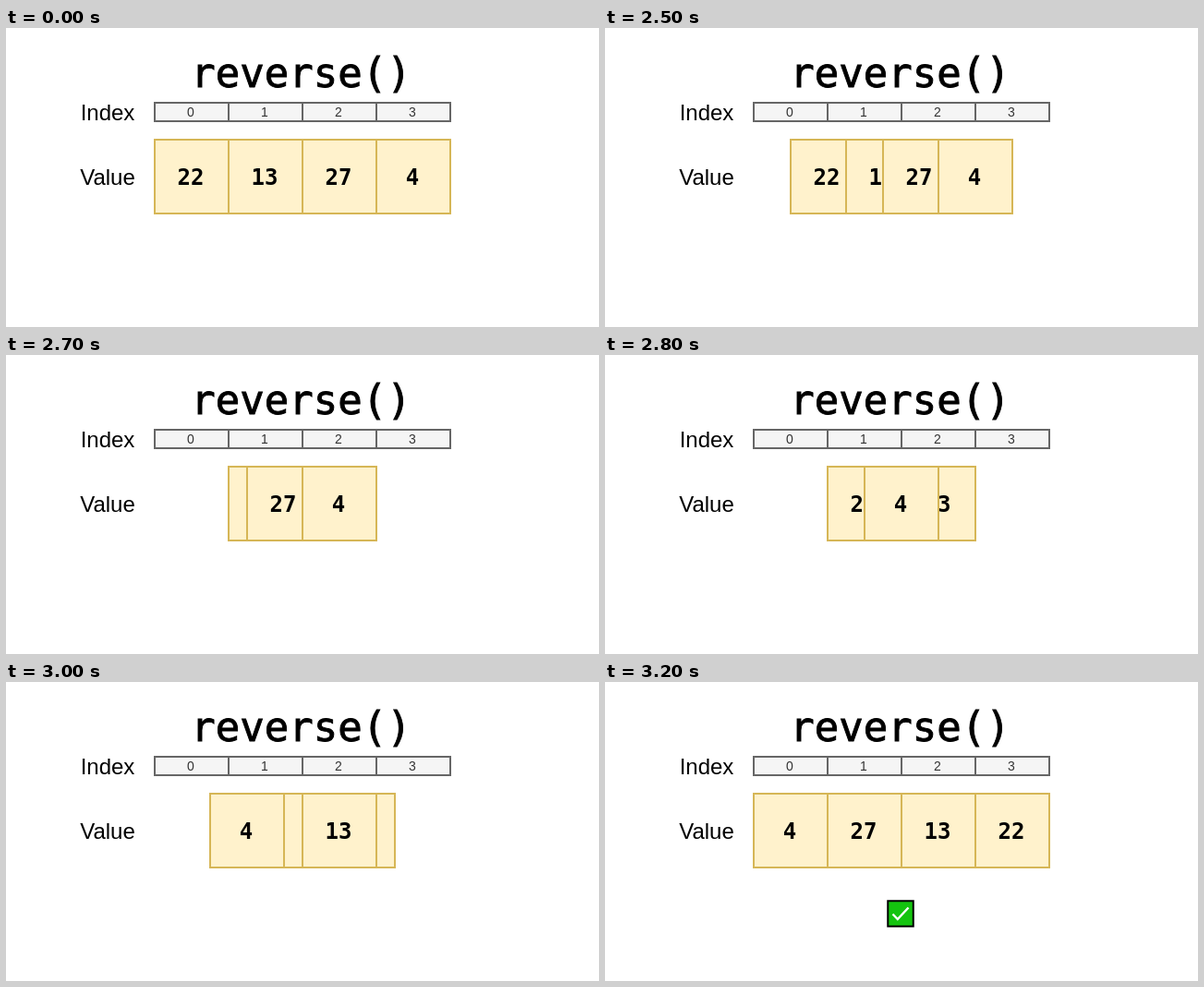
Recreate the animation shown at these times as an HTML page. Size 642 px wide and 324 px high, loop 5.2 s.

```html
<!DOCTYPE html>
<html lang="en">
<head>
<meta charset="utf-8">
<title>reverse()</title>
<style>
  html, body { margin: 0; width: 100%; height: 100%; overflow: hidden; background: #fff; }
  svg { display: block; width: 642px; height: 324px; }
  text { text-anchor: middle; }
  .title { font: 44px "DejaVu Sans Mono", monospace; stroke: #000; stroke-width: .9px; }
  .label { font: 24px "Liberation Sans", Arial, sans-serif; }
  .index { fill: #f5f5f5; stroke: #666; stroke-width: 2px; }
  .num { font: 14px "Liberation Sans", Arial, sans-serif; fill: #333; }
  .cell rect { fill: #fff2cc; stroke: #d6b656; stroke-width: 2px; }
  .cell text { font: bold 24px "DejaVu Sans Mono", monospace; }
  .line { fill: none; stroke: #000; stroke-width: 2px; }
  .head { stroke: #000; stroke-width: 2px; stroke-miterlimit: 10; }

  /* --dir: 1 moves right, -1 moves left */
  .cell, .arrows, .done { animation: 5.2s step-end infinite; }
  .outer { animation-name: outer; }
  .inner { animation-name: inner; }
  .arrows { animation-name: arrows; }
  .done { animation-name: done; }

  @keyframes outer {
    0% { transform: translateX(0); }
    48.076% { transform: translateX(calc(var(--dir) * 40px)); }
    49.999% { transform: translateX(calc(var(--dir) * 60px)); }
    51.922% { transform: translateX(calc(var(--dir) * 80px)); }
    53.845% { transform: translateX(calc(var(--dir) * 120px)); }
    55.768% { transform: translateX(calc(var(--dir) * 140px)); }
    57.691% { transform: translateX(calc(var(--dir) * 180px)); }
    59.614% { transform: translateX(calc(var(--dir) * 220px)); }
    61.537%, 100% { transform: translateX(calc(var(--dir) * 240px)); }
  }
  @keyframes inner {
    0% { transform: translateX(0); }
    48.076% { transform: translateX(calc(var(--dir) * 20px)); }
    49.999% { transform: translateX(calc(var(--dir) * 40px)); }
    51.922% { transform: translateX(calc(var(--dir) * 60px)); }
    53.845%, 100% { transform: translateX(calc(var(--dir) * 80px)); }
  }
  @keyframes arrows {
    0% { opacity: 0; }
    9.615% { opacity: 1; }
    48.076%, 100% { opacity: 0; }
  }
  @keyframes done {
    0% { opacity: 0; }
    61.537%, 100% { opacity: 1; }
  }
</style>
</head>
<body>
<svg viewBox="0 0 642 324">
  <defs>
    <path id="head" class="head" d="M0 2.24 L7 16.24 L0 12.74 L-7 16.24 Z"/>
  </defs>

  <text class="title" x="319.5" y="64">reverse()</text>
  <text class="label" x="110" y="100">Index</text>
  <text class="label" x="110" y="170">Value</text>

  <path class="index" d="M161 81 H481 V101 H161 Z M241 81 V101 M321 81 V101 M401 81 V101"/>
  <text class="num" x="200" y="96">0</text>
  <text class="num" x="280" y="96">1</text>
  <text class="num" x="360" y="96">2</text>
  <text class="num" x="440" y="96">3</text>

  <g class="cell outer" style="--dir: 1">
    <rect x="161" y="121" width="80" height="80"/>
    <text x="200" y="170">22</text>
  </g>
  <g class="cell inner" style="--dir: 1">
    <rect x="241" y="121" width="80" height="80"/>
    <text x="280" y="170">13</text>
  </g>
  <g class="cell inner" style="--dir: -1">
    <rect x="321" y="121" width="80" height="80"/>
    <text x="360" y="170">27</text>
  </g>
  <g class="cell outer" style="--dir: -1">
    <rect x="401" y="121" width="80" height="80"/>
    <text x="440" y="170">4</text>
  </g>

  <g class="arrows">
    <path class="line" d="M201 213.7 Q201 301 321 301 Q441 301 441 213.7"/>
    <path class="line" d="M281 213.7 Q281 261 321 261 Q361 261 361 213.7"/>
    <use href="#head" x="201" y="201"/>
    <use href="#head" x="281" y="201"/>
    <use href="#head" x="361" y="201"/>
    <use href="#head" x="441" y="201"/>
  </g>

  <g class="done">
    <rect x="306.25" y="237.25" width="27.5" height="27.5" fill="#14c40f" stroke="#000" stroke-width="2"/>
    <path d="M311.5 251.5 L316.8 257 L328.5 244.5" fill="none" stroke="#fff" stroke-width="2.4"/>
  </g>
</svg>
</body>
</html>
```
